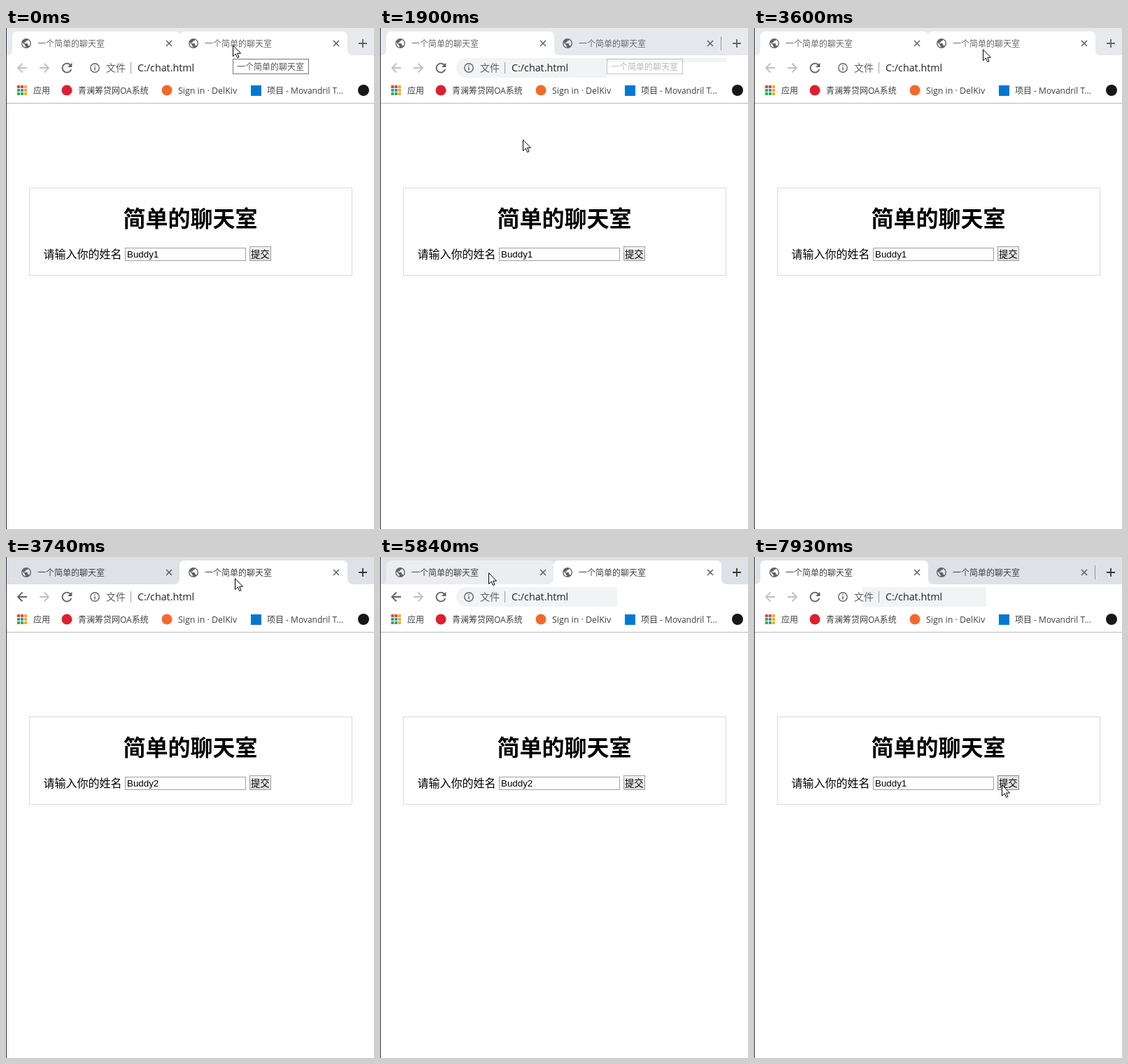
Write an HTML page that moves like this. It is 526x716 px and loops after 8000 ms.

```html
<!DOCTYPE html>
<html lang="zh">
<head>
<meta charset="utf-8">
<title>一个简单的聊天室</title>
<style>
html, body { margin: 0; width: 100%; height: 100%; overflow: hidden; background: #fefefe; }
svg { display: block; width: 526px; height: 716px; }
text { font: 12px 'Open Sans', 'Noto Sans CJK SC', 'Noto Sans CJK', sans-serif; fill: #3c4043; white-space: pre; }
.name { fill: inherit; }
.url { font-size: 14.3px; fill: #202124; }
.heading { font-size: 32px; font-weight: bold; fill: #000; }
.label { font-size: 16px; fill: #000; }
.field { font: 13.33px 'Liberation Sans', 'Noto Sans CJK SC', sans-serif; fill: #000; }
.icon { fill: none; stroke: #5f6368; }
.pale { stroke: #bdc1c6; }

/* every change is a hard step on one shared 8 s clock */
.strip, .active, .hover1, .hover2, .title, .plus, .split, .pill, .tip,
.first, .second, .back, .button, .pointer, .arrow, .beam { animation: 8s step-end infinite; }
.strip { animation-name: strip; }
.active { animation-name: active; }
.hover1 { animation-name: hover1; }
.hover2 { animation-name: hover2; }
.title { animation-name: title; }
.plus { animation-name: plus; }
.split { animation-name: split; }
.pill { animation-name: pill; }
.tip { animation-name: tip; }
.first { animation-name: first; }
.second { animation-name: second; }
.back { animation-name: back; }
.button { animation-name: button; }
.pointer { animation-name: move; }
.arrow { animation-name: arrow; }
.beam { animation-name: beam; }

@keyframes strip { 0% { fill: #e7e9ed } 46.75%, 100% { fill: #dee1e6 } }
@keyframes active { 0%, 78.375%, 100% { transform: none } 46.75% { transform: translateX(239px) } }
@keyframes hover1 { 0%, 78.375%, 100% { opacity: 0 } 71.125% { opacity: 1 } }
@keyframes hover2 {
  0%, 45% { fill: #fff }
  20.375% { fill: #f3f4f6 }
  21.875% { fill: #e5e8ec }
  43% { fill: #f3f4f6 }
  78.375%, 100% { fill: #dee1e6 }
}
@keyframes title { 0% { fill: #65696e } 46.75%, 100% { fill: #3c4043 } }
@keyframes plus { 0% { stroke: #5f6368 } 46.75%, 100% { stroke: #34383c } }
@keyframes split {
  0%, 45% { opacity: 0 }
  17.125%, 43% { opacity: .5 }
  18.625%, 78.375%, 100% { opacity: 1 }
}
@keyframes pill {
  0%, 45%, 78.375% { d: path("M0 0") }
  20.375% { d: path("M143 43H495V49H143Z") }
  23.75% { d: path("M123 43H495V49H324V71H123A14 14 0 0 1 123 43Z") }
  25.25% { d: path("M123 43H495V49H433V67H324V71H123A14 14 0 0 1 123 43Z") }
  52.125% { d: path("M303 43H339V71H303Z") }
  71.125% { d: path("M123 43H339V71H123A14 14 0 0 1 123 43Z") }
  85.375%, 100% { d: path("M155 43H332V71H155Z") }
}
@keyframes tip {
  0% { opacity: 1 }
  20.375% { opacity: .85 }
  21.875% { opacity: .65 }
  23.75% { opacity: .42 }
  25.25%, 100% { opacity: 0 }
}
@keyframes first { 0%, 78.375%, 100% { opacity: 1 } 46.75% { opacity: 0 } }
@keyframes second { 0%, 78.375%, 100% { opacity: 0 } 46.75% { opacity: 1 } }
@keyframes back { 0%, 78.375%, 100% { stroke: #bdc1c6 } 46.75% { stroke: #5f6368 } }
@keyframes button {
  0% { fill: url(#face); stroke: #a0a0a0 }
  90.625% { fill: url(#face); stroke: #8f8f8f }
  99.125%, 100% { fill: #e3e3e3; stroke: #8a8a8a }
}
@keyframes move {
  0% { transform: translate(324px, 24px) }
  17.125% { transform: translate(242px, 27px) }
  18.625% { transform: translate(151px, 30px) }
  20.375% { transform: translate(143px, 44px) }
  21.875% { transform: translate(168px, 54px) }
  23.75% { transform: translate(204px, 159px) }
  25.25% { transform: translate(80px, 253px) }
  27.125% { transform: translate(257px, 312px) }
  29% { transform: translate(251px, 334px) }
  32.125% { transform: translate(248px, 322px) }
  33.875% { transform: translate(248px, 319px) }
  39.25% { transform: translate(251px, 298px) }
  41.25% { transform: translate(325px, 44px) }
  43% { transform: translate(320px, 34px) }
  45% { transform: translate(327px, 30px) }
  52.125% { transform: translate(318px, 54px) }
  53.625% { transform: translate(262px, 210px) }
  55.125% { transform: translate(224px, 315px) }
  57.125% { transform: translate(219px, 315px) }
  58.875% { transform: translate(219px, 314px) }
  66.25% { transform: translate(220px, 290px) }
  67.75% { transform: translate(250px, 180px) }
  69.25% { transform: translate(276px, 76px) }
  71.125% { transform: translate(160px, 23px) }
  73% { transform: translate(155px, 22px) }
  85.375% { transform: translate(277px, 124px) }
  87.25% { transform: translate(318px, 225px) }
  89.125% { transform: translate(350px, 300px) }
  90.625% { transform: translate(355px, 317px) }
  92.5%, 100% { transform: translate(354px, 325px) }
}
@keyframes arrow {
  0%, 23.75%, 29%, 43%, 53.625%, 66.25%, 100% { opacity: 1 }
  21.875%, 25.25%, 32.125%, 52.125%, 55.125% { opacity: 0 }
}
@keyframes beam {
  0%, 23.75%, 29%, 43%, 53.625%, 66.25%, 100% { opacity: 0 }
  21.875%, 25.25%, 32.125%, 52.125%, 55.125% { opacity: 1 }
}
</style>
</head>
<body>
<svg viewBox="0 0 526 716">
  <defs>
    <linearGradient id="face" x2="0" y2="1">
      <stop stop-color="#f4f4f4"/><stop offset="1" stop-color="#dcdcdc"/>
    </linearGradient>
    <path id="tab" d="M1 39Q9 39 9 31V13Q9 5 17 5H241Q249 5 249 13V31Q249 39 257 39Z"/>
    <g id="mark">
      <path transform="translate(20.6 13.6) scale(.7)" fill="#5f6368" d="M12 2a10 10 0 1 0 0 20a10 10 0 0 0 0-20zm-1 17.930c-3.950-.490-7-3.850-7-7.930 0-.620.080-1.210.210-1.790L9 15v1c0 1.100.900 2 2 2zm6.900-2.540c-.260-.810-1-1.390-1.900-1.390h-1v-3c0-.550-.450-1-1-1H8v-2h2c.550 0 1-.450 1-1V7h2c1.100 0 2-.900 2-2v-.410c2.930 1.190 5 4.060 5 7.410 0 2.080-.800 3.970-2.100 5.390z"/>
      <path class="icon" d="M229 18L237 26M237 18L229 26" stroke-width="1.6"/>
      <text class="name" x="45" y="27">一个简单的聊天室</text>
    </g>
  </defs>

  <!-- tab strip -->
  <rect class="strip" width="526" height="39"/>
  <use class="hover1" href="#tab" fill="#ebedf0"/>
  <g transform="translate(239)"><use class="hover2" href="#tab"/></g>
  <rect y="39" width="526" height="68" fill="#fff"/>
  <use class="active" href="#tab" fill="#fff"/>
  <g class="title">
    <use href="#mark"/>
    <use href="#mark" x="239"/>
  </g>
  <path class="split" d="M487.5 12V32" stroke="#92969b"/>
  <path class="plus" d="M504 22H516M510 16V28" stroke-width="1.8"/>

  <!-- toolbar -->
  <path class="pill" fill="#f1f3f4"/>
  <g class="icon" stroke-width="1.8">
    <path class="back" d="M30 57H17.5M23.5 50.5L17 57L23.5 63.5"/>
    <path class="pale" d="M48 57H60.5M54.5 50.5L61 57L54.5 63.5"/>
  </g>
  <path transform="translate(76 46) scale(.92)" fill="#5f6368" d="M17.65 6.35A8 8 0 1 0 19.730 14h-2.080A6 6 0 1 1 16.220 7.780L13 11h7V4z"/>
  <circle class="icon" cx="127" cy="57" r="6.2" stroke-width="1.4"/>
  <path class="icon" d="M127 56V60.5M127 53.300V54.800" stroke-width="1.5"/>
  <text x="143" y="62" style="font-size:14px;fill:#5f6368">文件</text>
  <path d="M178.5 49V65" stroke="#9aa0a6"/>
  <text class="url" x="188" y="62">C:/chat.html</text>

  <!-- bookmarks -->
  <path d="M16 82h4v4h-4zM21 82h4v4h-4z" fill="#ea4335"/>
  <path d="M26 82h4v4h-4zM26 87h4v4h-4z" fill="#fbab05"/>
  <path d="M16 87h4v4h-4zM16 92h4v4h-4zM21 92h4v4h-4z" fill="#34a853"/>
  <path d="M21 87h4v4h-4z" fill="#4285f4"/>
  <path d="M26 92h4v4h-4z" fill="#fbab05"/>
  <text x="39" y="94">应用</text>
  <circle cx="87" cy="89" r="7.5" fill="#df1f2d"/>
  <text x="103" y="94">青澜筹贷网OA系统</text>
  <circle cx="230" cy="89" r="7.5" fill="#f4692a"/>
  <text x="246" y="94" style="font-size:12.4px">Sign in · DelKiv</text>
  <rect x="350" y="82" width="15" height="15" fill="#0078d4"/>
  <text x="373" y="94">项目 - Movandril T...</text>
  <circle cx="511" cy="89" r="8" fill="#15171a"/>
  <path d="M0 107.5H526" stroke="#b8babc"/>

  <!-- page -->
  <rect x="33.5" y="228.5" width="461" height="125" fill="none" stroke="#b9b9b9" stroke-dasharray="1 1"/>
  <text class="heading" x="167.5" y="284">简单的聊天室</text>
  <text class="label" x="53.5" y="329">请输入你的姓名</text>
  <rect x="170.5" y="314.5" width="172" height="18" fill="#fff" stroke="#a0a0a0"/>
  <text class="field first" x="173" y="328">Buddy1</text>
  <text class="field second" x="173" y="328">Buddy2</text>
  <rect class="button" x="348.5" y="312.5" width="30" height="20"/>
  <text class="field" x="350" y="328">提交</text>
  <path d="M.5 0V716" stroke="#2b3445"/>

  <g class="tip">
    <rect x="324.5" y="44.5" width="108" height="21" fill="#fff" stroke="#767676"/>
    <text x="330" y="59.5" style="fill:#575757">一个简单的聊天室</text>
  </g>

  <g class="pointer">
    <path class="arrow" d="M.5 .8V16.5L4.2 13L6.7 18.5L9 17.5L6.6 12.2H11.5Z" fill="#fff" stroke="#000"/>
    <path class="beam" d="M0 1.5H3M4 1.5H7M3.5 2V15M0 15.5H3M4 15.5H7" fill="none" stroke="#000"/>
  </g>
</svg>
</body>
</html>
```
